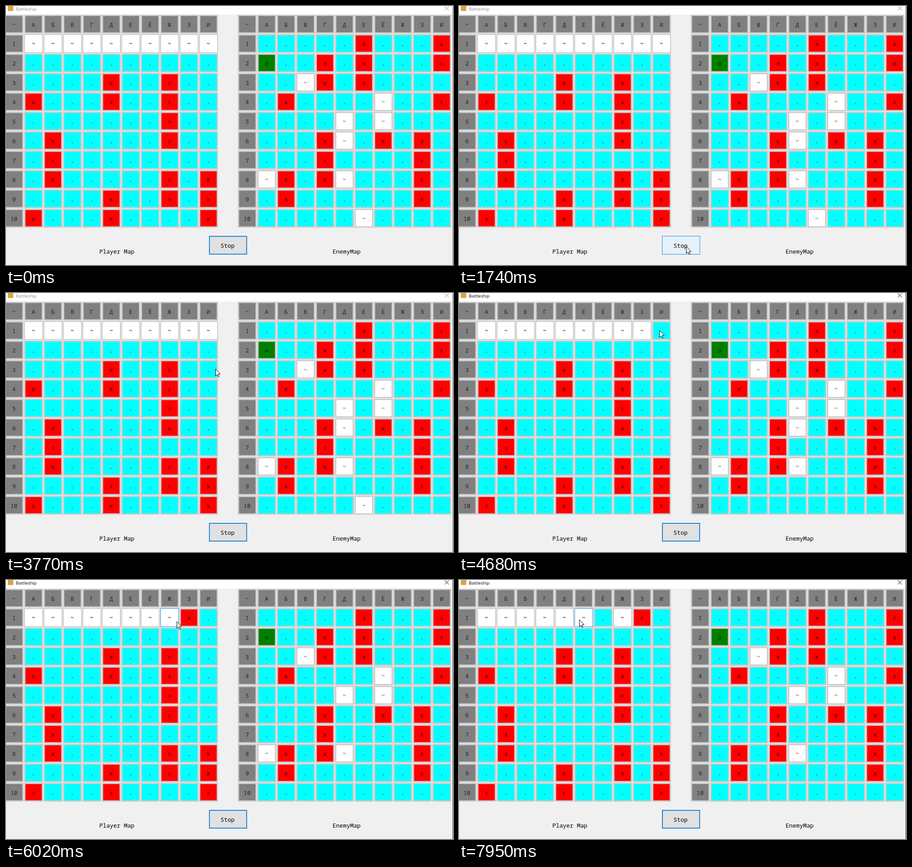
Animation of 982x570 px, one loop 7.99 s. Source, as an HTML page with a canvas:

```html
<!DOCTYPE html>
<html lang="en">
<head>
<meta charset="utf-8">
<title>Battleship</title>
<style>
html, body { margin: 0; width: 100%; height: 100%; overflow: hidden; background: #f0f0f0; }
canvas { display: block; }
</style>
</head>
<body>
<canvas id="stage" width="982" height="570"></canvas>
<script>
const ctx = document.getElementById('stage').getContext('2d');
const LOOP = 7990;
const UNIT = 0.854; // one window pixel on the scaled stage
const PITCH = 50 * UNIT, SIZE = 48 * UNIT;
const TOP = 40, LEFT = 17.9, RIGHT = 530.1;
const MONO = '12.85px "Noto Sans Mono", "DejaVu Sans Mono", monospace';
const UI = '9.7px "Open Sans", "Noto Sans", sans-serif';
const LETTERS = '~АБВГДЕЁЖЗИ';
const STOP = { x: 446, y: 506, w: 83.5, h: 41 };

// Each map lists its marks as column letter and row span
const PLAYER = {
  '~': [...LETTERS.slice(1)].map(c => c + 1).join(' '),
  x: 'Д3-4 Ж3-6 А4 Б6-8 Ж8-9 И8-10 Д9-10 А10'
};
const ENEMY = {
  '~': 'В3 Ё4-5 Д5-6 А8 Д8 Е10',
  x: 'Е1-3 И1-2 Г2-3 Б4 И4 Г6-8 Ё6 З6-9 Б8-9',
  o: 'А2'
};

// Shots on the first player row, each answered by a shot at the enemy map
const SHOTS = [
  { down: 4310, at: 'И1', mark: '.', reply: 'Е10' },
  { down: 5270, at: 'З1', mark: 'x', reply: 'Д6' },
  { down: 7250, at: 'Ё1', mark: '.', reply: 'А8' }
];
const PRESS = 90;

// Pointer strokes; `via` bends a stroke into a curve
const ENTRY = [901, 560];
const STROKES = [
  { from: 80, until: 870, to: [515, 461], via: [600, 385] },
  { from: 870, until: 1700, to: [498, 528], via: [468, 525] },
  { from: 1700, until: 2530, to: [525, 528], via: [510, 540] },
  { from: 2530, until: 3310, to: [517, 386], via: [557, 497] },
  { from: 3380, until: 4140, to: [440, 82], via: [443, 108] },
  { from: 4680, until: 5050, to: [404, 87] },
  { from: 5450, until: 5920, to: [375, 91] },
  { from: 6050, until: 6790, to: [336, 89] },
  { from: 6850, until: 7080, to: [314, 86] },
  { from: 7500, until: 7950, to: [264, 87] }
];

const FILL = { '.': '#00ffff', x: '#ff0000', o: '#008000', '~': '#ffffff' };
const INK = { '.': '#002828', x: '#400000', o: '#002800', '~': '#505048' };
const RINGS = {
  off: { edge: '#bfbfbf', rim: '#cccccc', inset: 3 },
  idle: { edge: '#adadad', rim: '#e1e1e1', inset: 2 },
  hover: { edge: '#0078d7', rim: '#e5f1fb', inset: 2 },
  press: { edge: '#005499', rim: '#cce4f7', inset: 2 }
};

function readMap(marks) {
  const map = {};
  for (const [mark, list] of Object.entries(marks)) {
    for (const item of list.split(' ')) {
      const [first, last = first] = item.slice(1).split('-').map(Number);
      for (let row = first; row <= last; row++) map[item[0] + row] = mark;
    }
  }
  return map;
}

function pointerAt(t) {
  if (t < STROKES[0].from) return null;
  let p = ENTRY;
  for (const { from, until, to, via } of STROKES) {
    if (t < from) break;
    const u = Math.min(1, (t - from) / (until - from)), v = 1 - u;
    p = p.map((a, i) => {
      const mid = via ? via[i] : (a + to[i]) / 2;
      return v * v * a + 2 * u * v * mid + u * u * to[i];
    });
  }
  return p;
}

function rect(x, y, w, h, color) {
  ctx.fillStyle = color;
  ctx.fillRect(x, y, w, h);
}

function inner({ x, y, w, h }, px, color) {
  const d = px * UNIT;
  rect(x + d, y + d, w - 2 * d, h - 2 * d, color);
}

function text(str, x, y, color, font = MONO, align = 'center') {
  ctx.font = font;
  ctx.textAlign = align;
  ctx.fillStyle = color;
  ctx.fillText(str, x, y);
}

function cellBox(left, col, row) {
  return {
    x: left + col * PITCH - SIZE / 2,
    y: TOP + row * PITCH - SIZE / 2,
    w: SIZE, h: SIZE
  };
}

function inside(p, b) {
  return p && p[0] >= b.x && p[0] < b.x + b.w && p[1] >= b.y && p[1] < b.y + b.h;
}

function cell(left, col, row, label, fill, ink, state = 'off') {
  const box = cellBox(left, col, row), ring = RINGS[state];
  inner(box, 0, ring.edge);
  inner(box, 1, ring.rim);
  inner(box, ring.inset, fill);
  text(label, left + col * PITCH - 0.3, TOP + row * PITCH + 5.6, ink);
}

function board(left, map, stateOf) {
  for (let row = 0; row <= 10; row++) {
    for (let col = 0; col <= 10; col++) {
      if (!row || !col) {
        cell(left, col, row, row ? String(row) : LETTERS[col], '#808080', '#262626');
        continue;
      }
      const name = LETTERS[col] + row, mark = map[name] || '.';
      const state = stateOf(name, mark, cellBox(left, col, row));
      cell(left, col, row, mark, FILL[mark], state === 'off' ? INK[mark] : '#000', state);
    }
  }
}

function titleBar(active) {
  const ink = active ? '#000' : '#8a8a8a';
  rect(0, 0, 982, 19, '#fff');
  rect(4, 0, 12, 11, '#d9a441');
  text('Battleship', 21.5, 9.9, ink, UI, 'left');
  ctx.strokeStyle = ink;
  ctx.lineWidth = 1;
  ctx.beginPath();
  ctx.moveTo(963.8, 0.8); ctx.lineTo(972.8, 9.8);
  ctx.moveTo(972.8, 0.8); ctx.lineTo(963.8, 9.8);
  ctx.stroke();
  rect(981, 0, 1, 570, active ? '#4a4a4a' : '#808080');
}

function stopButton(hover, focused) {
  inner(STOP, 0, focused || hover ? '#0078d7' : '#adadad');
  inner(STOP, focused && !hover ? 2 : 1, hover ? '#e5f1fb' : '#e1e1e1');
  text('Stop', 486.7, 532.2, '#000');
}

function arrow([x, y]) {
  ctx.save();
  ctx.translate(Math.round(x) + 0.5, Math.round(y) + 0.5);
  ctx.beginPath();
  [[0, 0], [0, 15], [3.4, 11.9], [5.8, 17], [8, 16], [5.7, 11], [10.4, 10.6]]
    .forEach(([px, py]) => ctx.lineTo(px, py));
  ctx.closePath();
  ctx.fillStyle = '#fff';
  ctx.fill();
  ctx.strokeStyle = '#000';
  ctx.lineWidth = 1;
  ctx.stroke();
  ctx.restore();
}

function draw(t) {
  const player = readMap(PLAYER), enemy = readMap(ENEMY);
  let pressed = null;
  for (const { down, at, mark, reply } of SHOTS) {
    if (t >= down + PRESS) {
      player[at] = mark;
      enemy[reply] = '.';
    } else if (t >= down) {
      pressed = at;
    }
  }
  const pointer = pointerAt(t);
  const felt = pointerAt(t - 60); // hover trails the pointer slightly

  rect(0, 0, 982, 570, '#f0f0f0');
  titleBar(t >= SHOTS[0].down);
  board(LEFT, player, (name, mark, box) => {
    if (mark !== '~') return 'off';
    if (name === pressed) return 'press';
    return inside(felt, box) ? 'hover' : 'idle';
  });
  board(RIGHT, enemy, () => 'off');
  stopButton(inside(felt, STOP), !pressed);
  text('Player Map', 205, 544.5, '#000', MONO, 'left');
  text('EnemyMap', 717.4, 544.5, '#000', MONO, 'left');
  if (pointer) arrow(pointer);
}

const start = performance.now();
function tick() {
  draw((performance.now() - start) % LOOP);
  requestAnimationFrame(tick);
}
tick();
</script>
</body>
</html>
```
